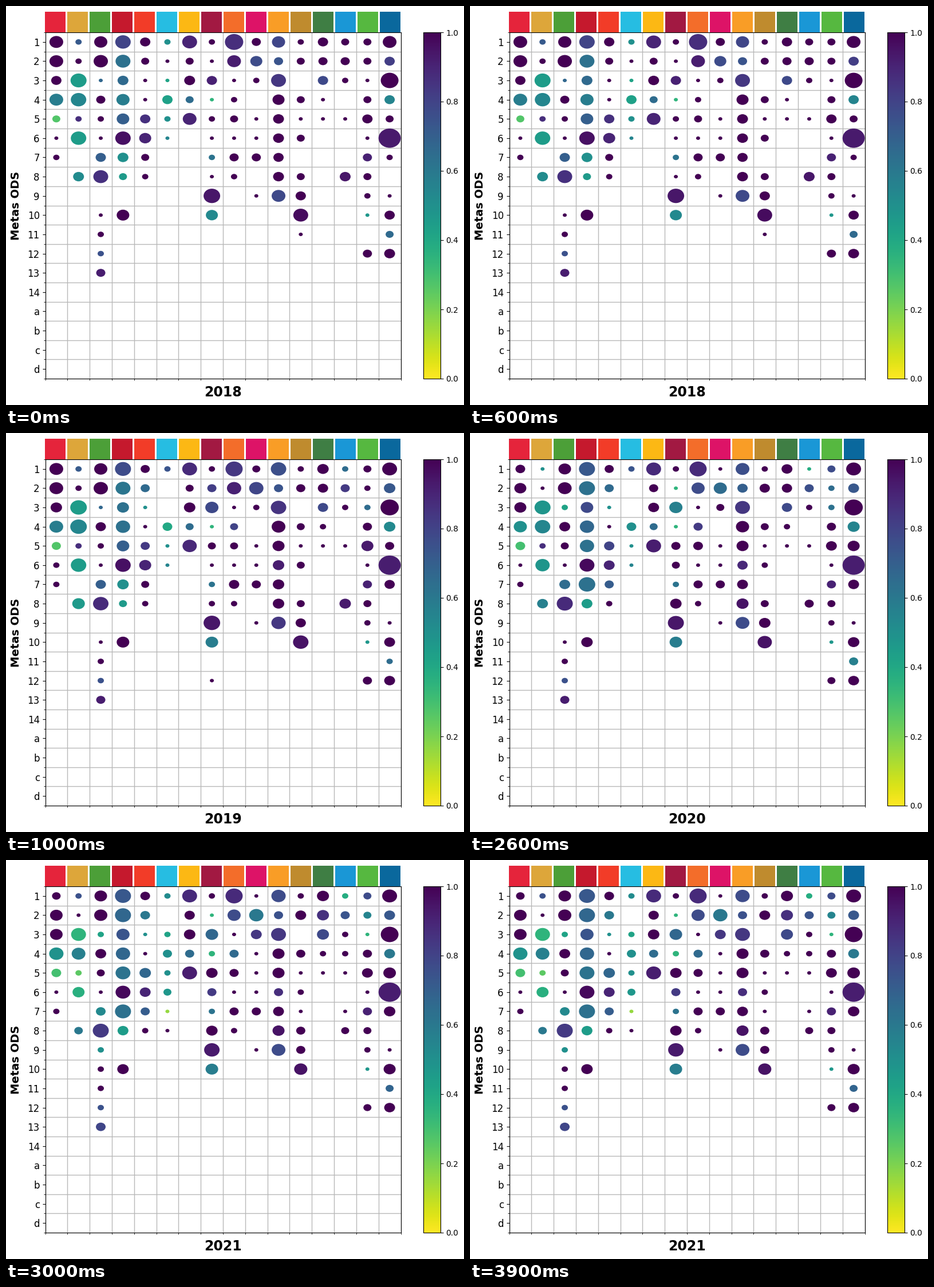
Write a matplotlib script that moves like this. It is 800 px wide and 697 px high and loops after 4500 ms.

```python
import matplotlib.pyplot as plt
from matplotlib.animation import FuncAnimation
from matplotlib.patches import Ellipse, Rectangle

W, H, DPI = 800, 697, 100
LEFT, TOP, RIGHT, BOTTOM = 68.5, 46, 689.5, 651
COLS, ROWS = 16, 18
CELL = (RIGHT - LEFT) / COLS
YEARS = (2018, 2019, 2020, 2021)
TILE_COLORS = ("#e5243b #dda63a #4c9f38 #c5192d #f23c28 #26bde2 #fcb814 #a21942 "
               "#f36d2a #dd1367 #f99d26 #bf8b2e #3f7e44 #1a97d6 #56b840 #0a689d").split()

plt.rcParams["font.family"] = "DejaVu Sans"
years = [{} for _ in YEARS]


def goal(number, *updates):
    """Store a column: row -> width or (width, score); later years list changes, 0 removes."""
    state = {}
    for year, update in zip(years, updates):
        state = {**state, **update}
        year[number] = state


goal(1,
     {1: 24, 2: 24, 3: 18, 4: (24, .58), 5: (14, .27), 6: 7, 7: 11},
     {3: 20, 5: (16, .27), 6: 11},
     {1: 17, 2: 21, 3: 21, 4: (23, .5), 5: (17, .3), 6: 7},
     {1: 15, 2: 22, 3: 22, 4: (25, .49)})
goal(2,
     {1: (11, .72), 2: 11, 3: (28, .45), 4: (27, .54), 5: (11, .87), 6: (27, .45), 8: (19, .52)},
     {3: (29, .45), 4: (29, .54), 8: (22, .46)},
     {1: (7, .5), 2: 7, 3: (28, .48), 4: (27, .54), 6: (25, .48), 8: (19, .57)},
     {1: (11, .75), 3: (26, .35), 4: (24, .57), 5: (11, .25), 6: (21, .37), 8: (15, .6)})
goal(3,
     {1: 23, 2: 25, 3: (7, .67), 4: 16, 5: 11, 6: 7, 7: (18, .7), 8: (26, .86),
      10: 7, 11: 11, 12: (11, .75), 13: (16, .92)},
     {4: 18, 8: (27, .88)},
     {1: 22, 2: 24, 3: (11, .42), 4: 19, 5: 14, 7: (19, .65), 8: (28, .88)},
     {2: 23, 7: (17, .53), 8: (28, .83), 9: (11, .5), 10: 11, 13: (17, .79)})
goal(4,
     {1: (27, .8), 2: (26, .63), 3: (19, .66), 4: (23, .58), 5: (22, .7), 6: (27, .96),
      7: (19, .5), 8: (14, .46), 10: 22},
     {1: (28, .77), 2: (26, .61), 3: (21, .63), 4: (25, .63), 7: (20, .5)},
     {1: (28, .73), 2: (28, .63), 3: (22, .78), 4: (25, .67), 5: (25, .63), 6: (26, .98),
      7: (29, .63), 8: (19, .45), 10: 20},
     {2: (28, .67), 3: (23, .74), 5: (26, .62), 7: (28, .63)})
goal(5,
     {1: 18, 2: 14, 3: 7, 4: 7, 5: (18, .86), 6: (21, .9), 7: 14, 8: 11},
     {1: 16, 2: (16, .66), 3: (7, .5), 5: (16, .83)},
     {5: (18, .8), 6: (19, .9), 7: (16, .71)},
     {1: 17, 2: (17, .6), 5: (20, .67)})
goal(6,
     {1: (11, .5), 2: 7, 3: (7, .42), 4: (18, .43), 5: (11, .5), 6: (7, .55)},
     {1: (11, .74), 2: 0, 3: 0, 4: (17, .4), 5: (7, .5)},
     {4: (17, .5)},
     {1: (11, .52), 3: (11, .42), 4: (16, .5), 5: (11, .5), 6: (14, .47), 7: (7, .16), 8: 7})
goal(7,
     {1: (26, .9), 2: 14, 3: 19, 4: (14, .65), 5: (24, .9)},
     {1: (26, .88), 3: 20, 5: (25, .89)},
     {2: 16, 3: 19, 5: (26, .92)},
     {2: 18, 3: 20, 4: (16, .65)})
goal(8,
     {1: 11, 2: 7, 3: (18, .91), 4: (7, .35), 5: 11, 6: 7, 7: (11, .62), 8: 7,
      9: (29, .94), 10: (21, .53)},
     {2: (16, .82), 3: (23, .78), 5: 14, 8: 11, 10: (22, .58), 12: 7},
     {2: (7, .35), 3: (23, .57), 5: 16, 6: 14, 8: 20, 9: (28, .94), 12: 0},
     {3: (22, .67), 4: (11, .35), 5: 20, 6: (16, .83), 9: (27, .93)})
goal(9,
     {1: (32, .87), 2: (24, .92), 3: 7, 4: 11, 5: 14, 6: 7, 7: 16, 8: 11},
     {1: (30, .84), 2: (25, .91), 4: (14, .8), 7: 18},
     {1: (30, .88), 2: (23, .77), 4: (16, .83), 5: 17, 7: 16},
     {4: (16, .66), 5: 16})
goal(10,
     {1: 16, 2: (21, .77), 3: 11, 5: 7, 6: 7, 7: 16, 9: 7},
     {1: 14, 2: (25, .79)},
     {1: 7, 2: (23, .65), 3: 14},
     {2: (25, .6), 3: (19, .84), 4: 7})
goal(11,
     {1: (23, .79), 2: (16, .74), 3: (26, .84), 4: 21, 5: 19, 6: 19, 7: 18, 8: 19, 9: (24, .78)},
     {1: (27, .76), 3: (27, .85), 4: 24, 5: 21, 6: (20, .92), 7: 20, 8: 20, 9: (25, .84)},
     {1: (24, .76), 2: (18, .7), 3: (26, .84), 4: 23, 6: (18, .89), 7: 19, 8: (21, .95),
      9: (24, .77)},
     {1: (25, .77), 2: (16, .75), 4: 21, 6: (16, .87)})
goal(12,
     {1: 11, 2: 14, 4: 14, 5: 7, 6: 14, 8: 14, 9: 18, 10: (26, .97), 11: 7},
     {2: 16, 10: (27, .95), 11: 0},
     {2: 18, 6: 11, 9: 20, 10: (25, .95)},
     {2: 19, 4: 16, 7: 7, 8: 16, 9: 16, 10: (23, .95)})
goal(13,
     {1: 18, 2: 16, 3: (18, .78), 4: 7, 5: 7},
     {1: 20, 2: 18, 4: 11},
     {1: 19},
     {1: 21, 2: (21, .86), 3: (21, .78)})
goal(14,
     {1: 14, 2: 16, 3: 11, 5: 7, 8: (19, .94)},
     {1: (11, .65), 2: (16, .83), 8: (20, .93)},
     {1: (7, .38), 2: (16, .76), 8: 16},
     {1: (11, .38), 2: (16, .74), 4: 11, 7: 7, 8: 14})
goal(15,
     {1: 14, 2: 14, 3: 7, 4: 14, 5: 18, 6: 7, 7: (16, .91), 8: 14, 9: 11, 10: (7, .47), 12: 16},
     {2: 11, 3: (11, .65), 4: 16, 5: (21, .93)},
     {1: (14, .77), 2: (11, .65), 3: (11, .63), 5: 19, 12: 14},
     {2: (14, .55), 3: (7, .35)})
goal(16,
     {1: 24, 2: (18, .82), 3: 31, 4: (18, .55), 5: 14, 6: (38.8, .93), 7: 11, 9: 7,
      10: 18, 11: (14, .66), 12: 19},
     {1: 26, 2: (20, .73), 3: 32, 4: (20, .53), 5: 16, 6: (38.8, .92), 7: 18, 10: 19,
      11: (11, .65)},
     {2: (19, .73), 4: (21, .55), 5: 21, 7: 19, 10: 20, 11: (16, .57)},
     {3: 31, 4: (19, .6), 5: 22, 7: 20, 10: 21, 11: (14, .68)})


def box(x0, y0, x1, y1):
    """Figure rectangle (left, bottom, width, height) from pixels counted from the top."""
    return x0 / W, 1 - y1 / H, (x1 - x0) / W, (y1 - y0) / H


fig = plt.figure(figsize=(W / DPI, H / DPI), dpi=DPI, facecolor="white")

for i, color in enumerate(TILE_COLORS):
    x = 68 + 39 * i
    left, bottom, width, height = box(x, 10, x + 36, 46)
    fig.add_artist(Rectangle((left, bottom), width, height, color=color, lw=0))

ax = fig.add_axes(box(LEFT, TOP, RIGHT, BOTTOM))
ax.set(xlim=(0.5, COLS + 0.5), ylim=(ROWS + 0.5, 0.5))
ax.set_axisbelow(True)
ax.set_xticks([])
ax.set_xticks([i + 0.5 for i in range(COLS + 1)], minor=True)
ax.set_yticks(range(1, ROWS + 1), [*map(str, range(1, 15)), *"abcd"], fontsize=12)
ax.set_yticks([i + 0.5 for i in range(ROWS + 1)], minor=True)
ax.grid(which="minor", color="#b8b8b8", lw=1)

cax = fig.add_axes(box(728.5, TOP, 758.5, BOTTOM))
cmap = plt.get_cmap("viridis_r")
fig.colorbar(plt.cm.ScalarMappable(plt.Normalize(0, 1), cmap), cax=cax)
cax.tick_params(labelsize=10)

fig.text(27 / W, 1 - 348.5 / H, "Metas ODS", rotation=90, fontsize=14,
         weight="bold", ha="right", va="center")
year_label = fig.text(379 / W, 1 - 682 / H, "", fontsize=17, weight="bold",
                      ha="center", va="baseline")


def draw(frame):
    index = min(frame // 2, len(YEARS) - 1)
    for bubble in list(ax.patches):
        bubble.remove()
    for col, rows in years[index].items():
        for row, entry in rows.items():
            width, score = entry if isinstance(entry, tuple) else (entry, 1.0)
            size = width / CELL
            ax.add_patch(Ellipse((col, row), size, size, fc=cmap(score), lw=0, zorder=3))
    year_label.set_text(str(YEARS[index]))
    return [*ax.patches, year_label]


anim = FuncAnimation(fig, draw, frames=9, interval=500, repeat=True, repeat_delay=0, blit=False)
plt.show()
```
